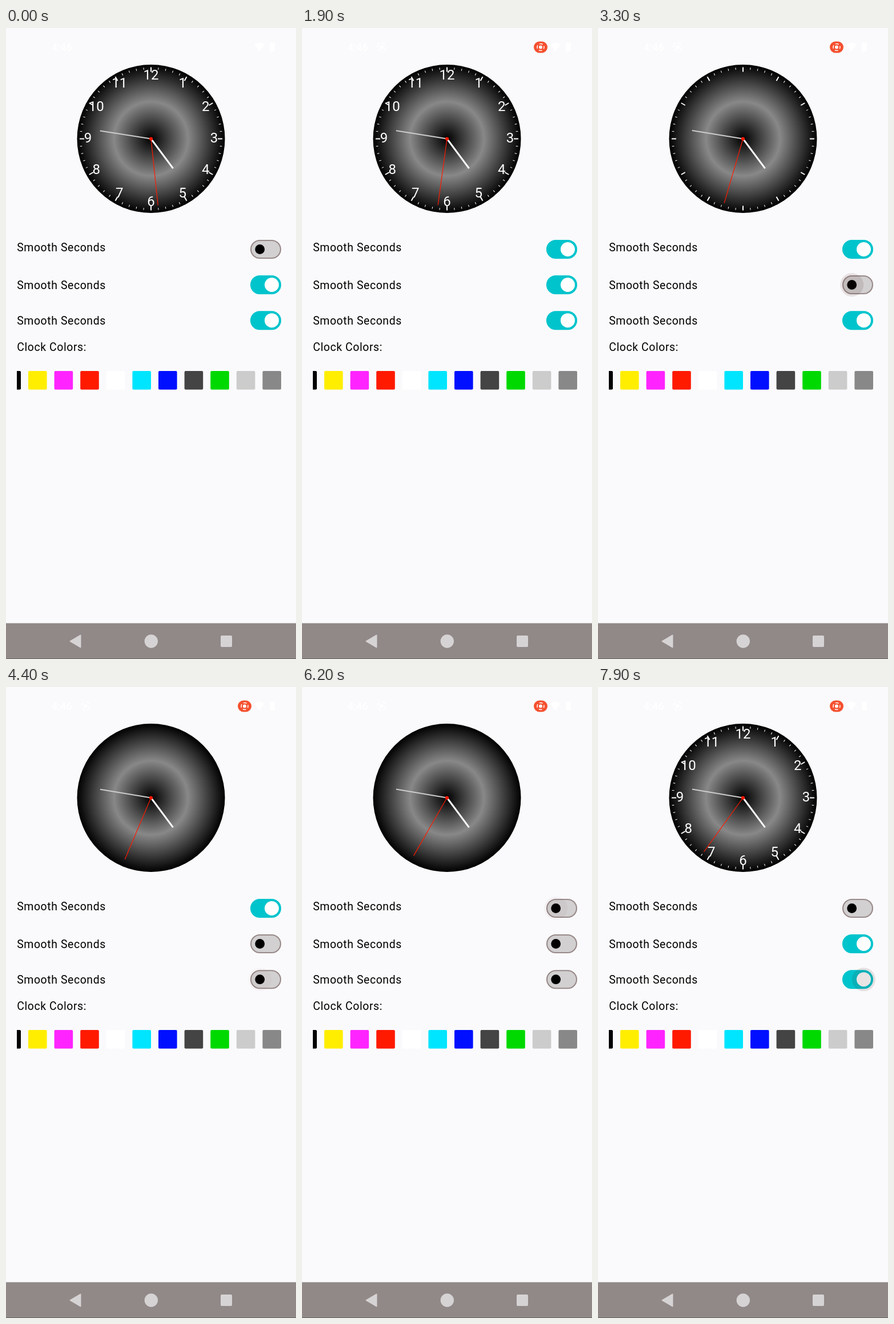
An HTML page that plays this animation: 508 by 1102 pixels, repeating every 8 s.

```html
<!DOCTYPE html>
<html lang="en">
<head>
<meta charset="utf-8">
<title>Analog clock settings</title>
<style>
  html, body { margin: 0; width: 100%; height: 100%; overflow: hidden; background: #fafafc; }
  svg { display: block; width: 100vw; height: 100vh; }
  text { font-family: Roboto, sans-serif; }
  .label { font-size: 19.4px; letter-spacing: .61px; fill: #000; }
  .numeral { font-size: 24px; fill: #fff; text-anchor: middle; }
</style>
</head>
<body>
<svg viewBox="0 0 508 1102">
  <defs>
    <radialGradient id="dial">
      <stop offset="0" stop-color="#000"/>
      <stop offset=".5" stop-color="#888"/>
      <stop offset="1" stop-color="#000"/>
    </radialGradient>
    <clipPath id="row"><rect x="19" y="590" width="464" height="50"/></clipPath>
  </defs>
  <rect width="508" height="1102" fill="#fafafc"/>

  <g fill="#fff">
    <text x="80" y="40" font-size="18" font-weight="500">4:46</text>
    <path d="M435 29Q444 22 453 29L444 41Z"/>
    <rect x="462" y="26" width="9" height="15" rx="2"/>
  </g>
  <g id="recording">
    <g fill="none" stroke="#fff" stroke-width="1.6">
      <circle cx="139.500" cy="33.500" r="7.500" stroke-dasharray="8 3.780"/>
      <circle cx="139.500" cy="33.500" r="2.500" fill="#fff"/>
    </g>
    <rect x="406" y="23.500" width="24" height="20" rx="10" fill="#f4502f"/>
    <circle cx="418" cy="33.500" r="3" fill="#fff"/>
    <circle cx="418" cy="33.500" r="6" fill="none" stroke="#fff" stroke-width="1.500"
      stroke-dasharray="6 3.425" stroke-dashoffset="3"/>
  </g>

  <circle cx="254" cy="193.500" r="129.500" fill="url(#dial)"/>
  <g id="ticks" stroke="#fff" transform="translate(254 193.500)"></g>
  <g id="numerals"></g>
  <g transform="translate(254 193.500)">
    <line id="hour" y2="-64.500" stroke="#fff" stroke-width="3"/>
    <line id="minute" y2="-90.300" stroke="#ccc" stroke-width="2"/>
    <line id="second" y2="-116.800" stroke="#ff1a00" stroke-width="1.200"/>
    <circle r="3.100" fill="#ff1a00"/>
  </g>

  <text class="label" x="19.200" y="390.200">Smooth Seconds</text>
  <text class="label" x="19.200" y="455.700">Smooth Seconds</text>
  <text class="label" x="19.200" y="517.700">Smooth Seconds</text>
  <text class="label" x="19.200" y="564.200">Clock Colors:</text>
  <g id="swatches" clip-path="url(#row)"></g>

  <rect y="1039.500" width="508" height="62.500" fill="#918888"/>
  <rect y="1101" width="508" height="1" fill="#6b6464"/>
  <g fill="#d6d3d4" stroke="#d6d3d4" stroke-width="2" stroke-linejoin="round">
    <path d="M112.500 1071L130.500 1060.500V1081.500Z"/>
    <circle cx="254.300" cy="1071" r="10.700"/>
    <rect x="377" y="1062" width="18" height="18" rx="1"/>
  </g>
  <g id="switches"></g>
</svg>
<script>
const LOOP = 8000, STEP = 100;
const $ = id => document.getElementById(id);
const clamp = v => Math.max(0, Math.min(1, v));

function add(parent, tag, attrs, text) {
  const el = document.createElementNS('http://www.w3.org/2000/svg', tag);
  set(el, attrs);
  if (text) el.textContent = text;
  return parent.appendChild(el);
}
function set(el, attrs) {
  for (const key in attrs) el.setAttribute(key, attrs[key]);
}
const show = (el, on) => set(el, { visibility: on ? 'visible' : 'hidden' });
const rotate = (id, deg) => set($(id), { transform: `rotate(${deg})` });

for (let i = 0; i < 60; i++) {
  const major = i % 5 === 0;
  add($('ticks'), 'line', {
    y1: -125, y2: major ? -117 : -121.3,
    'stroke-width': major ? 2 : 1, transform: `rotate(${i * 6})`
  });
}
for (let n = 1; n <= 12; n++) {
  const a = n * Math.PI / 6;
  add($('numerals'), 'text', {
    class: 'numeral', x: 254 + 110.5 * Math.sin(a), y: 200 - 110.5 * Math.cos(a)
  }, String(n));
}
['#000', '#ffee00', '#ff24ff', '#ff1a00', '#fff', '#00e5ff', '#000fff', '#444', '#00d900', '#ccc', '#888']
  .forEach((fill, i) => add($('swatches'), 'rect', {
    x: -6.6 + 45.6 * i, y: 599, width: 32.6, height: 32.6, rx: 2, fill
  }));

// Each switch starts in state `on` and flips at every time in `taps`.
const switches = [
  { y: 386.5, on: false, taps: [920, 5950], touchY: 398 },
  { y: 448.5, on: true, taps: [3140, 6920], touchY: 453 },
  { y: 510.7, on: true, taps: [4130, 7770], touchY: 515 }
];
for (const s of switches) {
  const g = $('switches');
  s.track = add(g, 'rect', { x: 429, y: s.y - 15.5, width: 52, height: 31, rx: 15.5, 'stroke-width': 2.1 });
  s.thumb = add(g, 'circle', { cy: s.y });
  s.ripple = add(g, 'circle', { cy: s.y, fill: '#4a2020' });
  s.touch = add(g, 'circle', {
    cx: 454, cy: s.touchY, r: 11,
    fill: 'rgba(255,255,255,.45)', stroke: 'rgba(0,0,0,.16)', 'stroke-width': 1.2
  });
}

function drawSwitch(s, t) {
  const past = s.taps.filter(tap => tap <= t);
  const on = s.on !== (past.length % 2 === 1);
  const since = past.length ? t - past[past.length - 1] : Infinity;
  const moved = clamp(since / 100);
  const p = on ? moved : 1 - moved;
  const cx = 444.7 + 20.8 * p;
  set(s.track, { fill: on ? '#00c4cc' : '#d2d0d1', stroke: on ? '#00c4cc' : '#998a8a' });
  set(s.thumb, { cx, r: 8.4 + 4.1 * p, fill: on ? '#fff' : '#000' });
  set(s.ripple, {
    cx, r: 6 + 14.5 * clamp(since / 130),
    opacity: .12 * Math.min(clamp(since / 130), clamp((300 - since) / 150))
  });
  show(s.touch, s.taps.some(tap => t > tap - 130 && t < tap + 100));
  return on;
}

function secondAngle(t) {
  if (t < 920) return t < 600 ? 174 : 180;
  if (t < 5950) return 182.3 + 6.1 * (t / 1000 - 1);
  return t < 7000 ? 210 : 216;
}

function draw(t) {
  const [, numerals, ticks] = switches.map(s => drawSwitch(s, t));
  const sec = secondAngle(t);
  rotate('second', sec);
  rotate('minute', 276 + sec / 60);
  rotate('hour', 143 + sec / 720);
  show($('numerals'), numerals);
  show($('ticks'), ticks);
  show($('recording'), t >= 300);
}

const start = performance.now();
function frame() {
  const t = (performance.now() - start) % LOOP;
  draw(Math.floor(t / STEP) * STEP);
  requestAnimationFrame(frame);
}
frame();
</script>
</body>
</html>
```
